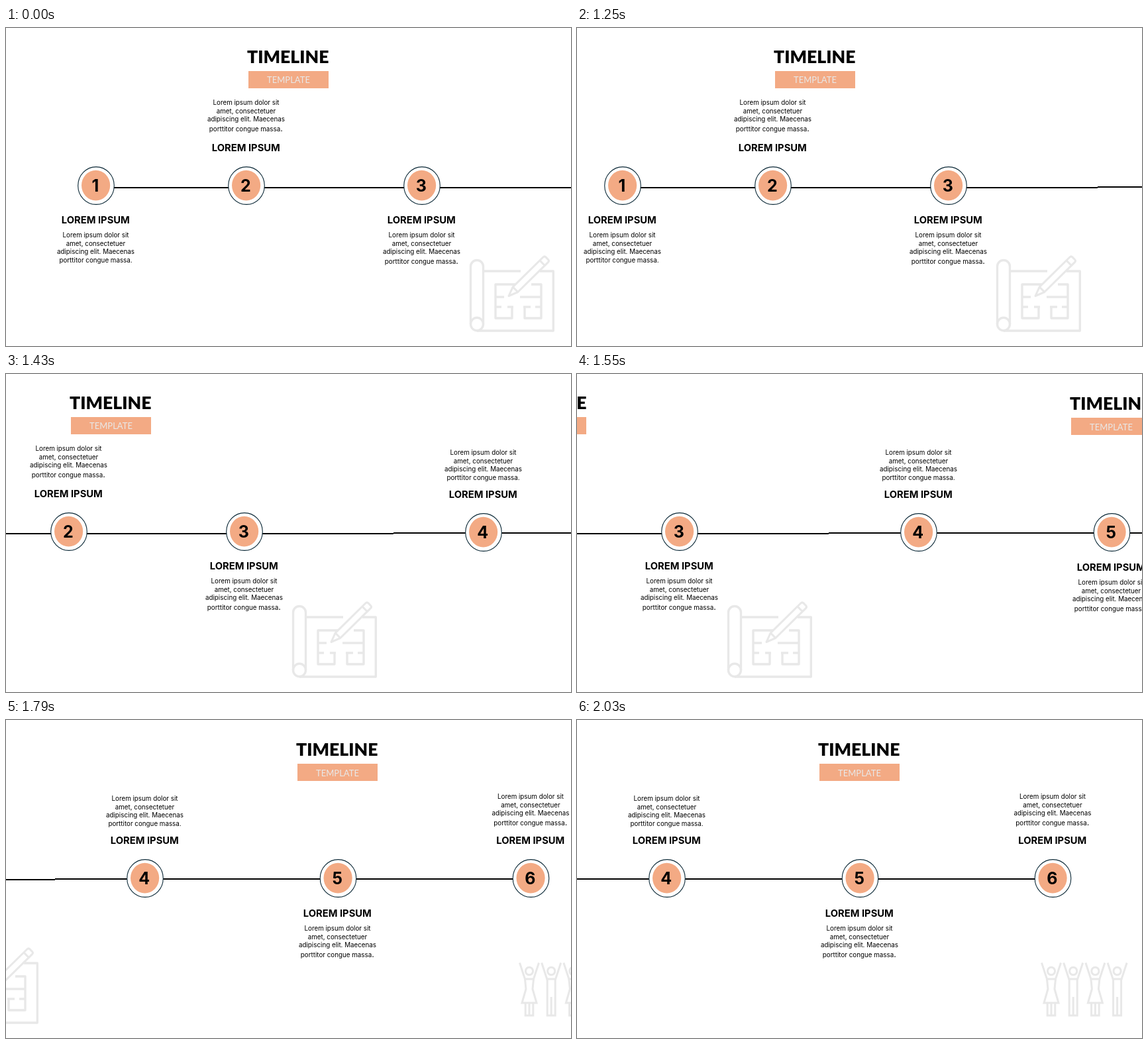
Recreate the animation shown at these times as an HTML page with a canvas. Size 853 by 480 pixels, loop 3.23 s.

```html
<!DOCTYPE html>
<html lang="en">
<head>
<meta charset="utf-8">
<title>Timeline</title>
<style>
html, body { margin: 0; width: 100%; height: 100%; overflow: hidden; background: #fff; }
canvas { display: block; width: 853px; height: 480px; }
</style>
</head>
<body>
<canvas id="stage" width="853" height="480"></canvas>
<script>
const W = 853, H = 480, LOOP = 3230;
const PUSH_START = 1130, STEP = 60, STEPS = 16, RATE = 0.066;
const PEACH = '#f3aa84', GREY = '#e8e8e8', RING = '#0b2836';
const SANS = 'Inter, "Liberation Sans", sans-serif';
const GEO = 'Lato, "Open Sans", sans-serif';
const LINES = ['Lorem ipsum dolor sit', 'amet, consectetuer', 'adipiscing elit. Maecenas', 'porttitor congue massa'];

const ctx = document.getElementById('stage').getContext('2d');

function text(str, x, y, font, color = '#000', align = 'center') {
  ctx.font = font;
  ctx.fillStyle = color;
  ctx.textAlign = align;
  ctx.fillText(str, x, y);
}

function ellipse(x, y, rx, ry) {
  ctx.beginPath();
  ctx.ellipse(x, y, rx, ry, 0, 0, Math.PI * 2);
}

// Strokes a polyline given as x, y pairs.
function line(...p) {
  ctx.beginPath();
  for (let i = 0; i < p.length; i += 2) ctx.lineTo(p[i], p[i + 1]);
  ctx.stroke();
}

function pen(color, width) {
  ctx.strokeStyle = color;
  ctx.lineWidth = width;
}

function header(y) {
  text('TIMELINE', 425.8, y + 53, `900 26.6px ${GEO}`);
  ctx.fillStyle = PEACH;
  ctx.fillRect(366, y + 65, 121, 26);
  text('TEMPLATE', 426.5, y * 2 + 83, `400 13px ${GEO}`, GREY);
}

function badge(n, x, y) {
  ellipse(x, y, 27.3, 28.4);
  ctx.fillStyle = '#fff';
  ctx.fill();
  pen(RING, 1.1);
  ctx.stroke();
  ellipse(x - 0.4, y - 0.4, 21.6, 22.9);
  ctx.fillStyle = PEACH;
  ctx.fill();
  text(n, x - 1.2, y + 8.8, `700 25px ${SANS}`);
}

// A wide last line sits lower and ends in a larger full stop.
function copy(x, headY, bodyY, wide) {
  text('LOREM IPSUM', x - 0.2, headY, `700 14.75px ${SANS}`);
  const font = `400 9.8px ${SANS}`;
  for (let i = 0; i < 3; i++) text(LINES[i], x, bodyY + i * 12.5, font);
  const lastY = bodyY + (wide ? 39.8 : 37.8);
  if (!wide) return text(LINES[3] + '.', x, lastY, font);
  ctx.font = font;
  const w = ctx.measureText(LINES[3]).width;
  const left = x - w / 2 - 2;
  text(LINES[3], left, lastY, font, '#000', 'left');
  text('.', left + w, lastY, `400 12.4px ${SANS}`, '#000', 'left');
}

function blueprint() {
  pen(GREY, 3.4);
  ctx.lineJoin = 'round';
  ctx.beginPath();
  ctx.moveTo(701.5, 447);
  ctx.lineTo(701.5, 360);
  ctx.arc(711, 360, 9.5, Math.PI, 0);
  ctx.lineTo(720.5, 447);
  ctx.stroke();
  ellipse(711, 447, 9.5, 9.8);
  ctx.stroke();
  line(720.5, 367, 777, 367);
  line(806, 367, 826.3, 367, 826.3, 457, 711, 457);

  line(769, 387, 739, 387, 739, 438, 764, 438, 764, 421);
  line(793, 387, 808, 387, 808, 438, 783, 438, 783, 421);
  line(739, 406, 752, 406);
  line(776, 406, 808, 406);
  line(739, 421, 748, 421);
  line(757, 421, 766, 421);
  line(781, 421, 792, 421);
  line(799, 421, 808, 421);

  ctx.save();
  ctx.translate(759, 404.5);
  ctx.rotate(-0.777);
  pen(GREY, 3);
  ctx.beginPath();
  ctx.moveTo(0, 0);
  ctx.lineTo(14, -5.4);
  ctx.lineTo(78, -5.4);
  ctx.quadraticCurveTo(81, -5.4, 81, -2.5);
  ctx.lineTo(81, 2.5);
  ctx.quadraticCurveTo(81, 5.4, 78, 5.4);
  ctx.lineTo(14, 5.4);
  ctx.closePath();
  ctx.stroke();
  line(14, -5.4, 14, 5.4);
  line(71, -5.4, 71, 5.4);
  ctx.restore();
  ctx.lineJoin = 'miter';
}

function person(x, skirt) {
  ctx.save();
  ctx.translate(x, 0);
  ellipse(0, 379, 5.6, 5.8);
  ctx.stroke();
  line(-14.5, 366.5, -6.5, 391, 6.5, 391, 14.5, 366.5);
  if (skirt) {
    line(-6.5, 391, -5, 406, -11, 427, 11, 427, 5, 406, 6.5, 391);
    line(-5.8, 427, -5.8, 446, 5.8, 446, 5.8, 427);
    line(0, 427, 0, 446);
  } else {
    line(-6, 391, -6, 446, 6, 446, 6, 391);
    line(0, 418, 0, 446);
  }
  ctx.restore();
}

function slideOne() {
  header(0);
  pen('#000', 2);
  line(136, 241, W, 241);
  badge('1', 136, 238);
  badge('2', 363, 238);
  badge('3', 628, 238);
  copy(135.5, 295, 316, false);
  copy(362.5, 186, 116, true);
  copy(627.5, 295, 316, true);
  blueprint();
}

function slideTwo() {
  header(1);
  pen('#000', 2);
  line(0, 240, 718, 240);
  badge('4', 136, 239);
  badge('5', 427.5, 239);
  badge('6', 718.5, 239);
  copy(135.5, 187, 122, false);
  copy(426.5, 297, 318, true);
  copy(718, 187, 119, true);
  pen(GREY, 3);
  for (let i = 0; i < 4; i++) person(716 + i * 33.2, i % 2 === 0);
}

// Quadratic ease in and out, advanced in fixed steps.
function shiftAt(t) {
  const step = Math.floor((t - PUSH_START) / STEP) + 1;
  const u = Math.min(Math.max(step, 0), STEPS) * RATE;
  if (u >= 1) return W;
  const p = u < 0.5 ? 2 * u * u : 1 - 2 * (1 - u) ** 2;
  return Math.round(W * p);
}

function place(slide, x) {
  if (x <= -W || x >= W) return;
  ctx.save();
  ctx.beginPath();
  ctx.rect(x, 0, W, H);
  ctx.clip();
  ctx.translate(x, 0);
  slide();
  ctx.restore();
}

function draw() {
  const shift = shiftAt(performance.now() % LOOP);
  ctx.fillStyle = '#fff';
  ctx.fillRect(0, 0, W, H);
  place(slideOne, -shift);
  place(slideTwo, W - shift);
  requestAnimationFrame(draw);
}

draw();
</script>
</body>
</html>
```
